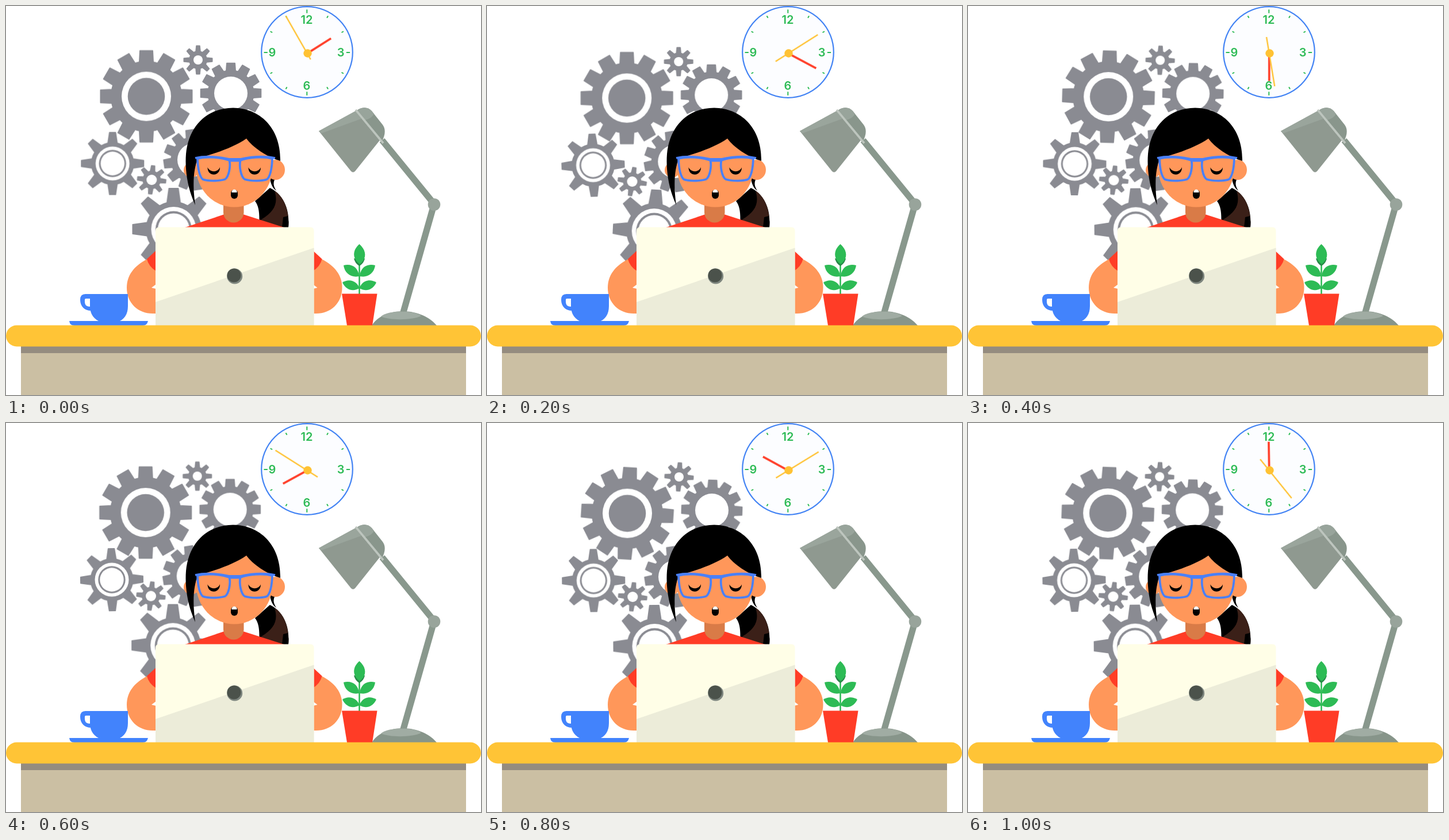
An HTML page for the animation above (1200 ms loop, 826 px wide and 678 px high).

```html
<!DOCTYPE html>
<html lang="en">
<head>
<meta charset="utf-8">
<title>Working at the desk</title>
<style>
  html, body { margin: 0; width: 100%; height: 100%; overflow: hidden; background: #fff; }
  svg { display: block; width: 100%; height: 100%; }
  .num { font: 600 20px Inter, "Open Sans", sans-serif; fill: #2dbb55; text-anchor: middle; }
  .skin { fill: #ff975a; }
  .red { fill: #ff3c26; }
  .blue { fill: #4283fc; }
  .leaf { fill: #2dbb55; }
</style>
</head>
<body>
<svg viewBox="0 0 826 678" xmlns="http://www.w3.org/2000/svg">
  <defs>
    <g id="arm">
      <path class="skin" d="M261 430L246 441C222 453 210 470 210 491C210 518 230 536 255 536H261Z"/>
      <path class="red" d="M261 426L245 441Q248 454 261 462Z"/>
      <path fill="#fff" d="M253 491L261 485V493Z"/>
    </g>
    <path id="eye" d="M350.500 281C350 298 372.500 298 372 281C369 290.500 354 290.500 350.500 281Z"/>
    <path id="lens" d="M333 266C350 261.500 375 264 388.500 269C391 281 387 298 381 302C370 305.500 350 305.500 342 302C336 296 333.500 280 333 266Z"/>
    <g id="leaves">
      <path d="M587 452C601 448 613 456 614 471C600 474 589 466 587 452Z"/>
      <path d="M585 482C597 474 611 480 614.500 492C604 498 592 496 585 482Z"/>
    </g>
  </defs>

  <g id="gears" fill="#8a8b92" stroke="#8a8b92" stroke-width="2" stroke-linejoin="round"></g>

  <g id="clock">
    <circle cx="523.500" cy="80.500" r="79.300" fill="#fcfdff" stroke="#4283f4" stroke-width="2.200"/>
    <g id="ticks" stroke="#2dbb55" stroke-width="2"></g>
    <text class="num" x="523" y="31">12</text>
    <text class="num" x="582" y="88">3</text>
    <text class="num" x="523" y="145.500">6</text>
    <text class="num" x="463" y="88">9</text>
    <path id="hour" d="M0 0V50" stroke="#ff3c26" stroke-width="3.600"/>
    <path id="minute" d="M0 0V87" stroke="#ffc233" stroke-width="2.400"/>
    <circle cx="524.500" cy="82.500" r="7.200" fill="#ffc233"/>
  </g>

  <g id="lamp">
    <path d="M654 234L744.500 345L690 537" fill="none" stroke="#89988d" stroke-width="11.200"/>
    <circle cx="744.500" cy="346" r="10.800" fill="#98a49b"/>
    <path d="M636 557C644 543 664 532 690 532C716 532 738 543 749 557Z" fill="#87958a"/>
    <path d="M652 541C665 530 710 530 722 540C708 548 665 548 652 541Z" fill="#a0aca3"/>
    <path d="M608 184L613 180C622 175 631 177 636 183L655 207C661 215 659 226 654 235Z" fill="#89968c"/>
    <path d="M608 184L613 180C622 175 631 177 636 183L640 188Q636 196 624 199Z" fill="#98a49b"/>
    <path d="M544 218L608 183L650 234L607 288Q603.500 291.500 600 288Z" fill="#8f9990"/>
    <path d="M544 218L608 183L619 196L548 222Z" fill="#9aa59c"/>
    <path d="M608 181L656 239" stroke="#bdc5be" stroke-width="3.600"/>
  </g>

  <g id="woman">
    <path d="M459 317C481 328 494 352 491 386H440C441 366 441 350 433 340Z"/>
    <path d="M467 322C474 345 466 359 444 372L446 386H491C493 358 484 333 467 322Z" fill="#3b2018"/>
    <path d="M482 368L490 366Q492 376 491 386H480Z"/>
    <path class="red" d="M308 387L380 363H412L487 387Z"/>
    <path d="M378 340H413.500V360A17.750 17.500 0 0 1 378 360Z" fill="#d97b47"/>
    <path d="M459 300C460 310 464 318 470 322C465 314 464 308 468 301Z"/>
    <circle class="skin" cx="322" cy="286" r="13"/>
    <ellipse class="skin" cx="469" cy="285.500" rx="16" ry="17.500"/>
    <ellipse class="skin" cx="397" cy="281" rx="66.500" ry="69.500"/>
    <path d="M329 347C315 316 311 284 313 258C318 206 352 178 395 177.500C441 178 478 212 477 270C453 263 429 246 418 231C397 246 362 258 334 265C326 284 324 310 329 347Z"/>
    <use href="#eye"/>
    <use href="#eye" x="71"/>
    <rect x="391" y="320" width="12" height="16" rx="6"/>
    <path d="M392.500 325C392 318 402 318 401.500 325Z" fill="#fff"/>
    <g fill="none" stroke="#4a80f8" stroke-width="3.800" stroke-linejoin="round">
      <use href="#lens"/>
      <use href="#lens" transform="translate(796) scale(-1 1)"/>
      <path d="M329 265C350 260.500 375 264 389 267H407C421 264 446 260.500 468 265"/>
      <path d="M389 268.500H407" stroke-width="6"/>
    </g>
    <use href="#arm"/>
    <use href="#arm" transform="translate(794.500) scale(-1 1)"/>
  </g>

  <g id="laptop">
    <path d="M260 557V392Q260 385.500 266 385.500H529.500Q535.500 385.500 535.500 392V557Z" fill="#fffee7"/>
    <path d="M260 516L535.500 421.500V557H260Z" fill="#ececd9"/>
    <circle cx="397.700" cy="471" r="13.500" fill="#7e867f"/>
    <circle cx="396.500" cy="469.500" r="12" fill="#4b524b"/>
  </g>

  <g id="cup" class="blue">
    <path d="M146 502H212V523C212 537 206 547 193 551H166C153 547 146 537 146 523Z"/>
    <path fill-rule="evenodd" d="M148 502H138Q129 502 129 512C129 524 137 531 148 531ZM146 510V524C139 524 137 520 137 515V512Q137 510 139 510Z"/>
    <path d="M110 549H247Q245 557 238 557H119Q111 557 110 549Z"/>
  </g>

  <g id="plant" class="leaf">
    <path d="M614.500 440V503" stroke="#2dbb55" stroke-width="2.600"/>
    <path d="M605 440Q607 449 614.500 453Q622 449 624 440Z" fill="#278a48"/>
    <path d="M614.500 415C627 426 628 440 615 450C602 440 602 426 614.500 415Z"/>
    <use href="#leaves"/>
    <use href="#leaves" transform="translate(1229) scale(-1 1)"/>
    <path class="red" d="M584 501.500H645.500L637 557H593Z"/>
  </g>

  <g id="desk">
    <path d="M26 590H800V678H26Z" fill="#cbbfa3"/>
    <path d="M26 590H800V605H26Z" fill="#958c7f"/>
    <rect y="556.500" width="826" height="37" rx="18.500" fill="#ffc436"/>
  </g>
</svg>
<script>
const NS = 'http://www.w3.org/2000/svg';
const byId = id => document.getElementById(id);

function add(parent, tag, attrs = {}) {
  const el = document.createElementNS(NS, tag);
  for (const key in attrs) el.setAttribute(key, attrs[key]);
  return parent.appendChild(el);
}

// Holds each pose for an equal share of the loop.
function hold(el, poses) {
  const frames = poses.map((transform, i) => ({
    transform, offset: i / poses.length, easing: 'step-end'
  }));
  frames.push({ transform: poses[poses.length - 1], offset: 1 });
  el.animate(frames, { duration: 1200, iterations: Infinity });
}

function gearPath(teeth, tip, root, top, base) {
  let d = '';
  for (let i = 0; i < teeth; i++) {
    const a = i * 2 * Math.PI / teeth;
    const at = (x, y) =>
      (x * Math.cos(a) - y * Math.sin(a)).toFixed(2) + ' ' +
      (x * Math.sin(a) + y * Math.cos(a)).toFixed(2);
    const y = -Math.sqrt(root * root - base * base);
    d += (i ? `A${root} ${root} 0 0 1 ` : 'M') + at(-base, y) +
      'L' + at(-top, -tip) + 'L' + at(top, -tip) + 'L' + at(base, y);
  }
  return d + `A${root} ${root} 0 0 1 ` + d.slice(1, d.indexOf('L')) + 'Z';
}

const big = gearPath(12, 79.5, 61, 11, 12);
const medium = gearPath(12, 52.3, 39.5, 7, 8);
const tall = gearPath(8, 71, 47.5, 8, 11.5);
const wide = gearPath(8, 54, 36.5, 5.2, 8);
const tiny = gearPath(8, 24.5, 15, 2.8, 3.8);

const turn = [0, 0, 1.7, 0, 3.5, 2];
const back = [0, -2, 0.5, -1, -0.5, -1];
const slow = [0, 3, -0.5, 0, -0.5, -0.5];

// x, y, outline, radii of alternating white and grey discs, turns, start angle
const gears = [
  [244, 157.5, big, [43, 32.3], turn, 0],
  [334, 94, tiny, [8], turn, 0],
  [391, 152, medium, [29], turn.map(a => a * 0.5), 0],
  [327, 268, medium, [29], back, -8],
  [185.3, 274.5, wide, [29.5, 23.7, 20.7], back, 0],
  [253.3, 303, tiny, [9], slow, 6],
  [291.5, 389, tall, [39, 31.5, 27.5], slow, 0]
];
const shake = [[0, 0], [-0.8, 3], [0.2, 0.6], [-1.3, -1.4], [0, 0], [-0.8, -0.4]];

hold(byId('gears'), shake.map(([x, y]) => `translate(${x}px, ${y}px)`));
for (const [x, y, d, discs, angles, start] of gears) {
  const g = add(byId('gears'), 'g', { transform: `translate(${x} ${y})` });
  hold(add(g, 'path', { d }), angles.map(a => `rotate(${a + start}deg)`));
  discs.forEach((r, i) => {
    const disc = add(g, 'circle', { r, stroke: 'none' });
    if (i % 2 === 0) disc.setAttribute('fill', '#fff');
  });
}

for (let i = 0; i < 12; i++) {
  const inner = i % 3 ? -69.5 : -68.5;
  add(byId('ticks'), 'path', {
    d: `M0 ${inner}V${i % 3 ? -73.5 : -74.8}`,
    transform: `translate(523.3 81) rotate(${i * 30})`
  });
}

// Each pose is an angle and the reach of the tip from the hub.
function swing(id, poses) {
  hold(byId(id), poses.map(([angle, reach]) =>
    `translate(523.8px, 82.7px) rotate(${angle}deg) translate(0px, ${-reach}px)`));
}
swing('hour', [[57.6, 49], [118, 55], [180, 48], [241.3, 48], [298.6, 50], [359, 50]]);
swing('minute', [[-29.7, 75], [57.6, 61], [170.6, 58], [302.4, 65.5], [58.5, 62], [141.1, 62]]);
</script>
</body>
</html>
```
